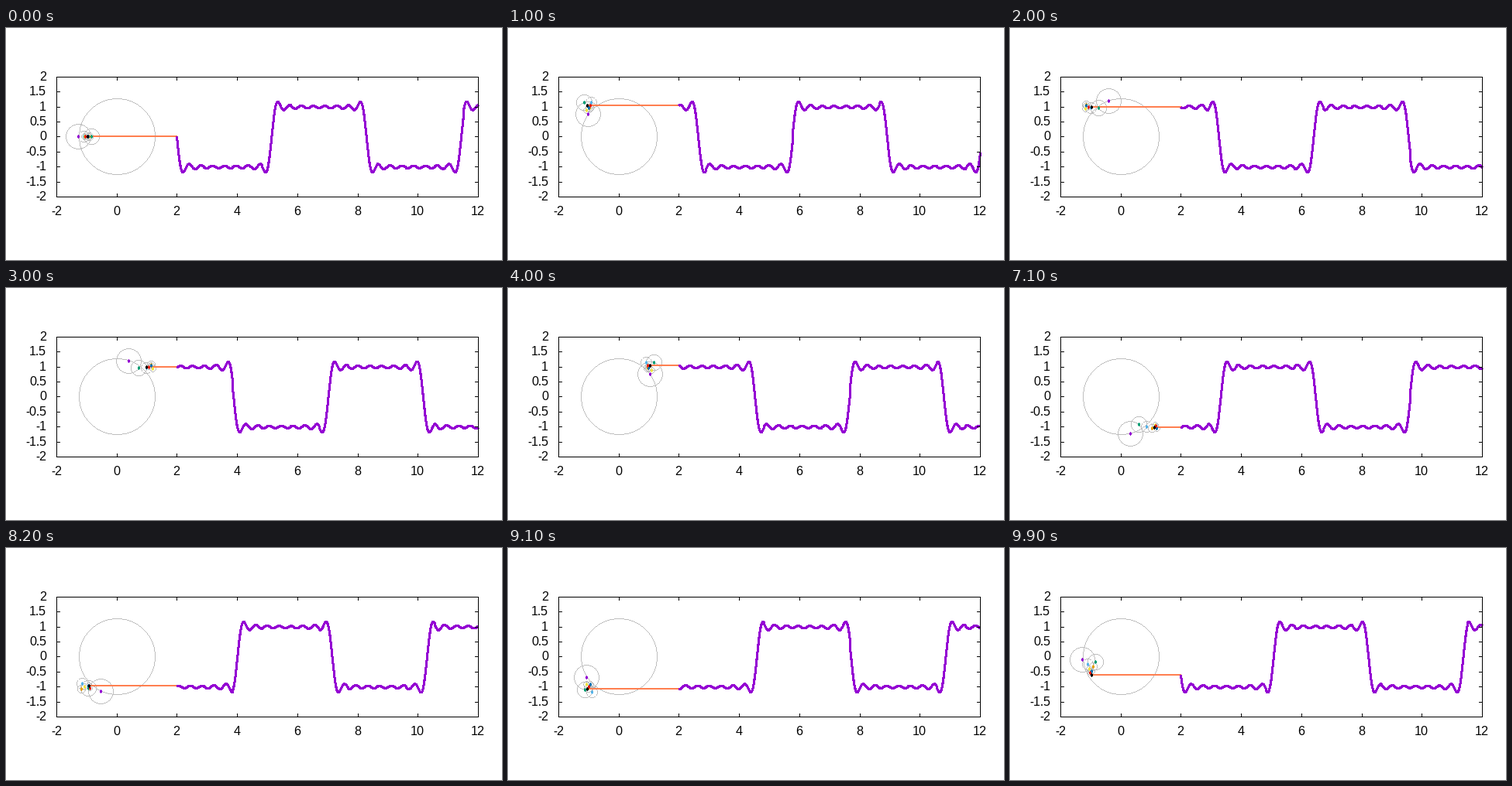
Recreate the animation shown at these times as a matplotlib script. Size 640 by 300 pixels, loop 10000 ms.

```python
import numpy as np
import matplotlib.pyplot as plt
from matplotlib.animation import FuncAnimation
from matplotlib.colors import to_rgb

W, H, DPI = 640, 300, 100
FRAMES, INTERVAL = 100, 100
PT = 72 / DPI                       # points per pixel
LEFT, RIGHT, TOP, BOTTOM = 65, 609, 63, 218
UNIT = (RIGHT - LEFT) / 14
COLORS = ["#9400d3", "#009e73", "#56b4e9", "#e69f00",
          "#f0e442", "#0072b2", "#e51e10", "#000000"]

k = np.arange(len(COLORS))
n = 2 * k + 1
radii = 4 / (np.pi * n)
flip = (-1.0) ** k


def whole(v):
    return np.floor(np.asarray(v) + 0.5).astype(int)


def col(x):
    return LEFT + whole((x + 2) * UNIT)


def row(y):
    return BOTTOM - whole((y + 2) * (BOTTOM - TOP) / 4)


def rgb(color):
    return whole(np.array(to_rgb(color)) * 255)


def ring(radius):
    """Pixel offsets of a one pixel wide circle."""
    r = whole(radius * UNIT)
    m = int(r / np.sqrt(2))
    d = np.arange(-m, m + 1)
    s = whole(np.sqrt(r * r - d * d))
    return np.r_[d, d, s, -s], np.r_[s, -s, d, d]


def square(t):
    return np.sin(np.outer(t, n)) @ radii


plt.rcParams.update({"font.family": "Liberation Sans",
                     "text.hinting": "native", "text.hinting_factor": 1})
fig = plt.figure(figsize=(W / DPI, H / DPI), dpi=DPI, facecolor="white")
ax = fig.add_axes([0, 0, 1, 1])
canvas = np.full((H, W, 3), 255, np.uint8)
image = ax.imshow(canvas, extent=(0, W, H, 0), aspect="auto",
                  interpolation="nearest", zorder=0)
ax.set_xlim(0, W)
ax.set_ylim(H, 0)
ax.axis("off")


def line(xs, ys, color, width, z):
    # A hard-edged stroke fills every pixel it touches, so the pen is thinner
    pen = max(width - 1, 0.4)
    return ax.plot(np.add(xs, 0.5), np.add(ys, 0.5), color=color, lw=pen * PT,
                   zorder=z, antialiased=False, snap=False,
                   solid_capstyle="butt")[0]


def label(x, y, value, ha):
    ax.text(x, y, f"{value:g}", fontsize=16 * PT, ha=ha, va="baseline")


# Frame, inward tics on all sides, and labels
line([LEFT, RIGHT, RIGHT, LEFT, LEFT], [TOP, TOP, BOTTOM, BOTTOM, TOP],
     "black", 1, 3)
for v in range(-2, 13, 2):
    x = col(v)
    line([x, x], [BOTTOM, BOTTOM - 4], "black", 1, 3)
    line([x, x], [TOP, TOP + 4], "black", 1, 3)
    label(x, 242.5, v, "center")
for v in np.arange(-2, 2.5, 0.5):
    y = row(v)
    line([LEFT, LEFT + 4], [y, y], "black", 1, 3)
    line([RIGHT, RIGHT - 4], [y, y], "black", 1, 3)
    label(52, y + 5, v, "right")

rings = [ring(r) for r in radii]
gray, coral = rgb("#bebebe"), rgb("#ff7f50")
dot_colors = [rgb(c) for c in COLORS]
dx, dy = np.meshgrid([-1, 0, 1], np.arange(-2, 3))
inside = abs(dx) + abs(dy) <= 2
dx, dy = dx[inside], dy[inside]

xs = np.linspace(2, 12, 400)
wave = line(col(xs), col(xs), "#9400d3", 3, 2)


def draw(i):
    theta = np.pi - 2 * np.pi * i / FRAMES
    cx = col(np.r_[0, np.cumsum(flip * radii * np.cos(n * theta))])
    cy = row(np.r_[0, np.cumsum(radii * np.sin(n * theta))])
    canvas[:] = 255
    for (ox, oy), x, y in zip(rings, cx, cy):
        canvas[y + oy, x + ox] = gray
    canvas[cy[-1] - 1:cy[-1] + 1, cx[-1]:col(2) + 1] = coral
    for color, x, y in zip(dot_colors, cx[1:], cy[1:]):
        canvas[y + dy, x + dx] = color
    image.set_data(canvas)
    wave.set_ydata(row(square(theta + xs - 2)) + 0.5)
    return image, wave


anim = FuncAnimation(fig, draw, frames=FRAMES, interval=INTERVAL,
                     repeat=True, repeat_delay=0, blit=False)
plt.show()
```
